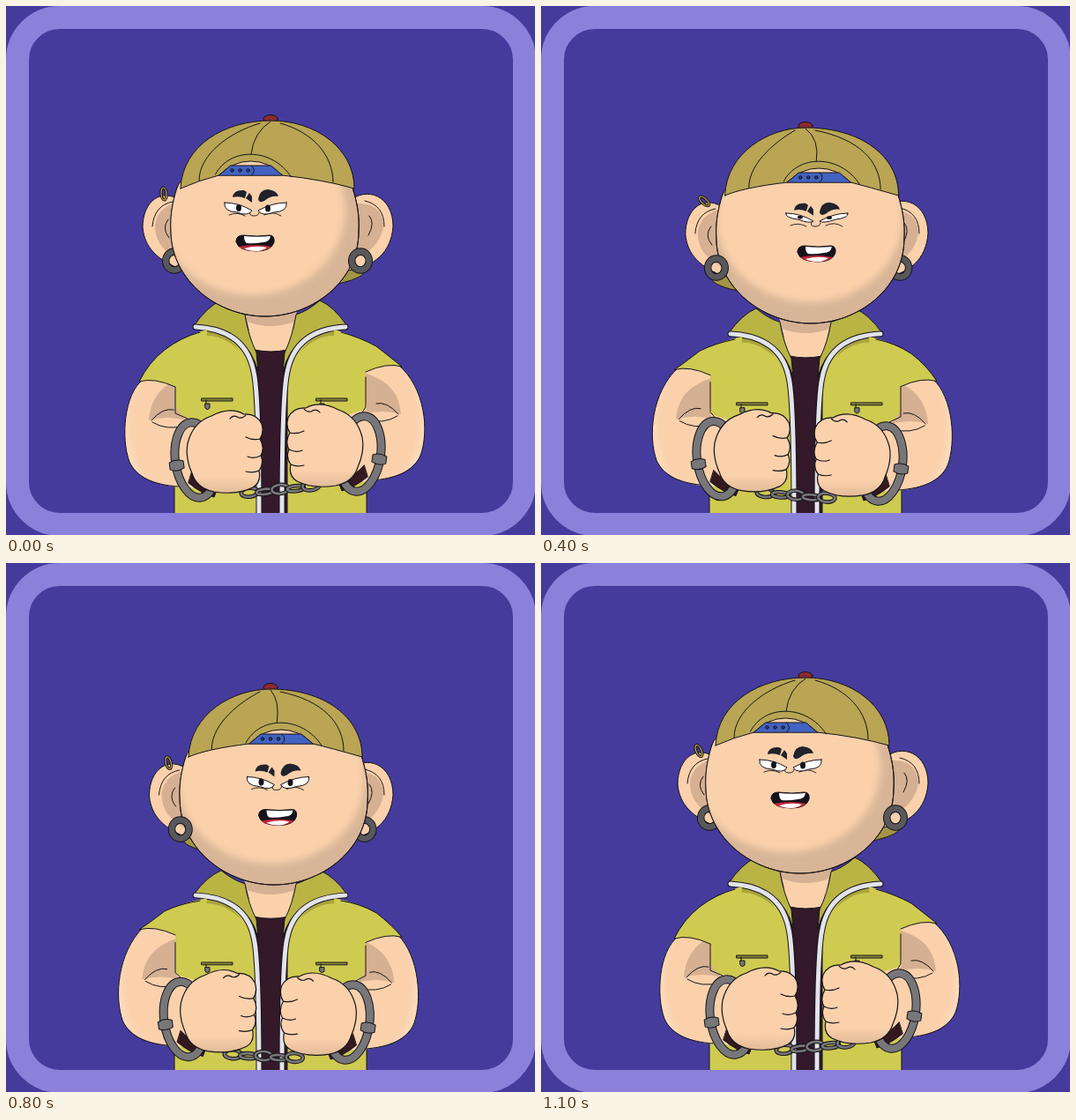
These frames come from a looping animation (600 px wide and 600 px high, 1200 ms). An HTML page:

```html
<!DOCTYPE html>
<html lang="en">
<head>
<meta charset="utf-8">
<title>Handcuffed character</title>
<style>
html, body { margin: 0; width: 100%; height: 100%; overflow: hidden; background: #453b9d; }
svg { display: block; width: 100vw; height: 100vh; }
path, ellipse { stroke-linejoin: round; stroke-linecap: round; }
</style>
</head>
<body>
<svg viewBox="0 0 600 600">
  <defs>
    <filter id="soft" x="-20%" y="-20%" width="140%" height="140%"><feGaussianBlur stdDeviation="4"/></filter>
    <linearGradient id="fist" x1="0" y1="0" x2="0" y2="1">
      <stop offset=".8" stop-color="#fad1ab"/><stop offset="1" stop-color="#e2bb98"/>
    </linearGradient>
    <radialGradient id="arm" cx=".6" cy=".5" r=".65">
      <stop offset=".75" stop-color="#fad1ab"/><stop offset="1" stop-color="#fde0c4"/>
    </radialGradient>
    <clipPath id="face"><path id="faceShape"/></clipPath>
  </defs>
  <g id="figure"></g>
  <rect x="13" y="13" width="575" height="575" rx="48" fill="none" stroke="#8b81db" stroke-width="26"/>
</svg>
<script>
const SKIN = '#fad1ab', TAN = '#d5b092', YELLOW = '#cfca50', OLIVE = '#bab445',
      CAP = '#b9a553', STEEL = '#77777a', INK = '#15131a';
const FACE = 'M194 206C188 225 186 240 187 256C188 312 240 352 294 352' +
  'C348 352 400 312 400 256C401 240 399 225 393 206C380 155 215 155 194 206Z';
document.getElementById('faceShape').setAttribute('d', FACE);

// One value per 100 ms step
const TURN = [0, .03, .18, .6, .88, 1, 1, .94, .75, .29, .08, 0];
const BOB = [0, 4.5, 13, 16, 8, 0];
const OPEN = [1, .7, .08, .08, .45, 1, 1, 1, 1, 1, 1, 1];
const HOOP = [-5, 0, 0, -20, -48, -25, -8, 0, -15, -38, -40, -25];

const path = (d, fill = 'none', width = 1, ink = INK) =>
  `<path d="${d}" fill="${fill}" stroke="${ink}" stroke-width="${width}"/>`;
const shape = (d, fill) => path(d, fill, 0);
const oval = (x, y, rx, ry, fill, width = 1, ink = INK) =>
  `<ellipse cx="${x}" cy="${y}" rx="${rx}" ry="${ry}" fill="${fill}" stroke="${ink}" stroke-width="${width}"/>`;
const group = (transform, content) => `<g transform="${transform}">${content}</g>`;
const move = (x, y, content) => group(`translate(${x} ${y})`, content);
const mirror = content => group('matrix(-1 0 0 1 600 0)', content);
const band = (d, width, color) => path(d, 'none', width + 2) + path(d, 'none', width, color);
const ring = (x, y, rx, ry, width, color) =>
  oval(x, y, rx, ry, 'none', width + 2) + oval(x, y, rx, ry, 'none', width, color);

function body(b) {
  const collar =
    shape('M224 374Q246 372 266 392Q252 371 226 366Z', '#aaa43c') +
    path('M213 363Q228 341 244 334Q258 346 271 350Q275 375 284 393L286 415Q274 365 213 363Z', OLIVE) +
    band('M215 364C254 366 275 384 281 415Q287 440 287 580', 5, '#e3e3ea');
  const pocket = path('M222 445H257V448H222Z', '#8d8839') +
    path('M227 447V451M226 451H231V456Q228 459 226 456Z', '#77777a');
  const content =
    shape('M191 580V430L182 392Q200 376 224 368H376Q400 376 418 392L409 430V580Z', YELLOW) +
    path('M191 580V422M409 580V422') +
    shape('M268 335H332L319 395H282Z', SKIN) +
    shape('M270 345H330L327 358Q300 368 274 358Z', TAN) +
    path('M282 390Q300 394 319 390V580H286Z', '#33192a') +
    collar + mirror(collar) + pocket + move(130, 0, pocket);
  return group(`translate(0 575) scale(1 ${1 - b / 212}) translate(0 -575)`, content);
}

// Left arm; the right one is its mirror image with the opposite turn
function arm(u, b) {
  const tip = 426 - 17 * u + .2 * b, shoulder = 390 - 4 * u + .6 * b;
  const dx = -10 * u, dy = -7 * u + .6 * b;
  const side = 192 - dx;   // where the jacket's side seam meets the moving arm
  const outer = `M${155 - dx} ${tip - 2 - dy}C134 440 130 490 140 517`;
  const limb =
    shape(`${outer}C150 538 180 548 220 546V470L${side} 464V${402 - dy}Z`, 'url(#arm)') +
    shape(`M162 470C164 446 176 432 ${side} 424V454Q198 464 205 470Q182 464 162 470Z`, TAN) +
    path(`${outer}C148 535 168 543 195 545M165 470Q178 455 190 458M166 472Q182 482 203 476M${side} 428V462L206 468`);
  const sleeve =
    shape(`M228 ${367 + b}Q200 ${375 + .8 * b} 180 ${shoulder}Q162 ${shoulder + 14} 151 ${tip}` +
      `Q168 ${tip - 5} 192 ${tip + 6}L225 430Z`, YELLOW) +
    path(`M220 ${370 + b}Q198 ${376 + .8 * b} 180 ${shoulder}Q162 ${shoulder + 14} 151 ${tip}Q168 ${tip - 5} 192 ${tip + 6}`);
  const cuff = path('M211 528Q222 541 240 547L236 557Q220 552 207 541Z', '#33191f') +
    group('rotate(-8 215 515)',
      ring(215, 515, 23, 43, 8, STEEL) +
      path('M185 514Q193 510 201 514V522Q193 526 185 522Z', STEEL));
  return move(dx, dy, limb) + sleeve + move(dx - 7 * u, dy, cuff);
}

function hand(u, b) {
  return move(-10 * u, -7 * u + .6 * b,
    path('M206 496Q212 472 233 465Q254 454 270 463Q284 462 290 474Q293 484 288 491' +
      'Q294 501 289 510Q293 519 287 527Q290 540 280 546Q262 555 236 551' +
      'Q216 547 211 530Q203 512 206 496Z', 'url(#fist)', 1.2) +
    path('M288 491Q280 493 272 489M289 510Q281 514 274 511M287 527Q280 530 272 528M254 468Q258 463 264 467Q269 468 272 464', 'none', 1.2));
}

function chain(u, b) {
  let links = '';
  for (let i = -2; i <= 2; i++)
    links += ring(17.5 * i, i % 2 ? 1 : 0, 9.5, i % 2 ? 3 : 5, 2.6, STEEL);
  return group(`translate(${311 - 25 * u} ${548 + .85 * b}) rotate(${-6 * (1 - 2 * u)})`, links);
}

function ears(u, b, step) {
  const left =
    path('M200 222C176 204 155 222 155 251C157 274 172 289 200 299Z', SKIN) +
    shape('M196 222Q172 228 169 248Q168 275 200 290Z', TAN) +
    path('M166 250Q168 226 189 222M184 242Q176 252 185 263');
  const right =
    path('M388 222C410 203 439 216 439 250C437 279 418 296 388 300Z', SKIN) +
    shape('M395 224Q427 222 428 250Q423 278 392 288Z', TAN) +
    path('M429 250Q429 226 407 221M412 238Q419 246 411 260');
  const hoop = group(`translate(${179 + 7 * u} ${213 + 1.05 * b}) rotate(${HOOP[step]})`,
    ring(0, 0, 3, 7, 1.2, '#c9b23c'));
  return move(10 * u, b, left) + move(0, b, right) + hoop;
}

function cap(u, b) {
  const x = 277.5 + 28 * u + 24 * u * (1 - u);   // opening, before the cap's own shift
  const left = 219 + 7 * u, right = 371 + 4 * u, top = 300 - 12 * u;
  return move(12 * u, b,
    oval(top, 128, 8, 4.5, '#8c2930') +
    path(`M198 207C200 158 248 130 ${top} 130C352 130 395 162 395 207Q360 197 ${x + 36} 192` +
      `Q${x + 20} 176 ${x} 176Q${x - 20} 176 ${x - 36} 192Q218 198 198 207Z`, CAP) +
    path(`M${x - 36} 192L${x - 23} 181H${x + 23}L${x + 36} 192Z`, '#4263c2') +
    [-21, -12, -3].map(d => oval(x + d, 186.5, 1.8, 1.8, '#293f8c')).join('') +
    path(`M${x + 1} 181Q${x + 7} 187 ${x + 1} 192`) +
    path(`M${x - 40} 191C${x - 24} 160 ${x + 24} 160 ${x + 46} 194`) +
    path(`M${top} 131Q${281 + 28 * u} 143 ${278 + 27 * u} 168`) +
    path(`M${top - 12} 133C${left + 35} 143 ${left} 168 ${left} 198`) +
    path(`M${top + 11} 133C${right - 23} 143 ${right} 169 ${right} 200`));
}

function features(u, b, open) {
  const low = 5 * (1 - open);
  const brows = move(0, low,
    shape('M257 217Q258 208 270 209L273 211L271 218Q264 215 257 217Z', '#20222c') +
    shape('M276 212L279 216L279 223L272 218Z', '#20222c') +
    shape('M286 219Q288 208 297 208Q307 209 309 216Q300 215 293 221Q287 224 286 219Z', '#20222c'));
  const eyes =
    path(`M248 223Q264 223 279 232Q275 ${232 + 7 * open} 262 ${227 + 7 * open}Q246 ${224 + 9 * open} 248 223Z`, '#fff') +
    path(`M318 223Q302 223 286 232Q290 ${232 + 7 * open} 304 ${227 + 7 * open}Q320 ${224 + 9 * open} 318 223Z`, '#fff') +
    oval(264, 226.5 + 2.5 * open, 3, 4 * open, INK, 0) +
    oval(297, 227 + 2.5 * open, 3, 4 * open, INK, 0);
  const wrinkles = path('M277 233Q275 238 281 238Q287 238 287 234M253 237Q262 233 271 238M293 237Q303 232 312 238', 'none', .9);
  const mouth =
    path('M261 267Q261 260 269 260Q285 262 299 260Q305 260 304 268Q301 278 284 278Q263 278 261 267Z', INK) +
    shape('M270 261Q285 262.5 300 261Q299 268 291 268Q281 270 273 269Q270 267 270 261Z', '#fff') +
    shape('M264 273Q283 269 301 273Q295 278 284 278Q269 278 264 273Z', '#bd2738') +
    shape('M270 275Q284 271 296 274Q290 278 284 278Q275 278 270 275Z', '#fff');
  return move(34 * u, 1.5 * b, wrinkles + eyes + brows + mouth);
}

function head(u, b, step) {
  const earring = (x, y) => ring(x, y + b, 9.8, 10.5, 6.5, '#59595c');
  const leftRing = earring(191 + 9 * u, 289), rightRing = earring(402 + 6 * u, 289);
  const leftFront = u > .15, rightFront = u < .5;
  const light = `<ellipse cx="${279 + 29 * u}" cy="232" rx="106" ry="96" fill="${SKIN}" filter="url(#soft)"/>`;
  const skin = move(13.5 * u, b,
    path(FACE, '#d8b597') +
    `<g clip-path="url(#face)">${move(-13.5 * u, 0, light)}</g>` +
    path(FACE));
  return oval(293 + 25 * (1 - 2 * u) ** 3, 300 + b, 89, 20, '#a39545') +
    ears(u, b, step) +
    (leftFront ? '' : leftRing) + (rightFront ? '' : rightRing) +
    skin +
    (leftFront ? leftRing : '') + (rightFront ? rightRing : '') +
    cap(u, b) + features(u, b, OPEN[step]);
}

const figure = document.getElementById('figure');
const start = performance.now();
let shown = -1;
function draw() {
  const step = Math.floor((performance.now() - start) % 1200 / 100);
  if (step !== shown) {
    shown = step;
    const u = TURN[step], b = BOB[step % 6];
    figure.innerHTML = body(b) + arm(u, b) + mirror(arm(1 - u, b)) + chain(u, b) +
      hand(u, b) + mirror(hand(1 - u, b)) + head(u, b, step);
  }
  requestAnimationFrame(draw);
}
draw();
</script>
</body>
</html>
```
